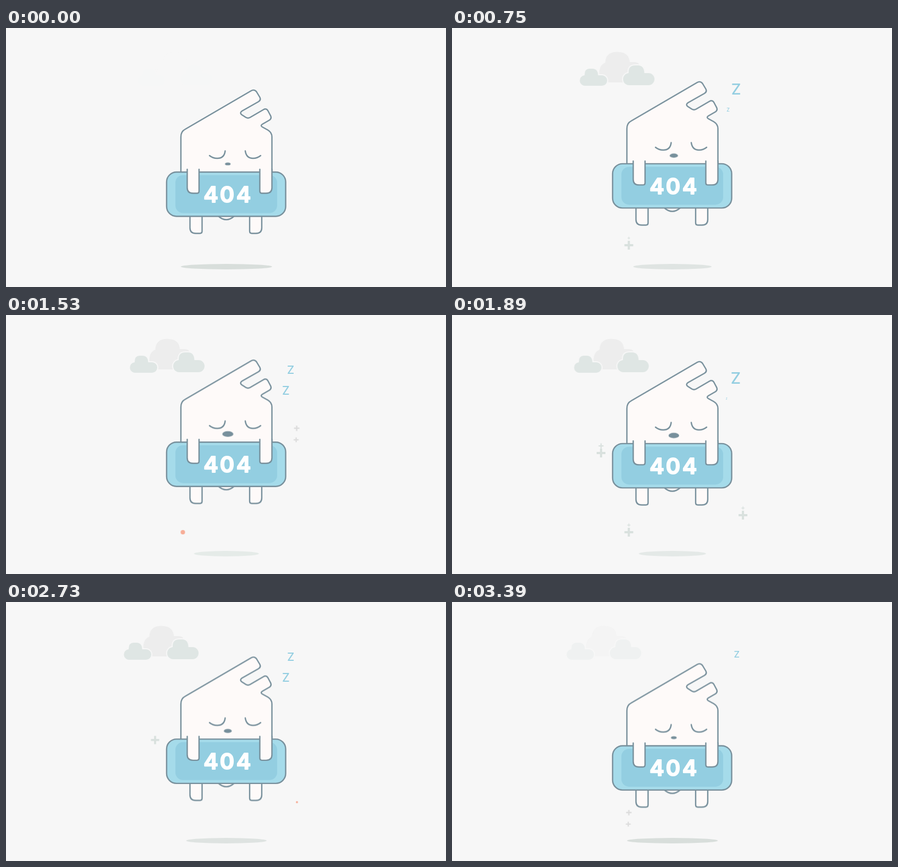
Recreate the animation shown at these times as an HTML page. Size 800 by 471 pixels, loop 3420 ms.

```html
<!DOCTYPE html>
<html lang="en">
<head>
<meta charset="utf-8">
<title>404</title>
<style>
  html, body { margin: 0; height: 100%; overflow: hidden; background: #f7f7f7; }
  svg { display: block; width: 800px; height: 471px; }
  svg * { animation: 3420ms linear infinite backwards; }

  .line { fill: none; stroke: #78909c; stroke-width: 2.4; stroke-linecap: round; stroke-linejoin: round; }
  .skin { fill: #fefaf9; }
  .sign { fill: #a5dbea; }
  .panel { fill: #93cee1; }
  .front { fill: #dfe6e4; stroke: #f7f7f7; stroke-width: 4; paint-order: stroke; }
  .code { font: 600 40px Inter, sans-serif; fill: #fff; stroke: #fff; stroke-width: 2; stroke-linejoin: round; text-anchor: middle; }

  .clouds { animation-name: drift, fade; }
  @keyframes drift { from { transform: translateX(13.9px); } to { transform: translateX(-17.2px); } }
  @keyframes fade { 0% { opacity: .03; } 14%, 89% { opacity: 1; } 100% { opacity: .3; } }

  .body { animation-name: float; }
  @keyframes float { 46.5%, 49.1% { transform: translateY(-32px); } }

  .mouth { fill: #78909c; animation-name: yawn; }
  @keyframes yawn { 0%, 100% { transform: scale(.5); } 46.5%, 49.1% { transform: scale(1); } }

  .shadow { fill: #d8dedb; animation-name: shrink; }
  @keyframes shrink { 46.5%, 49.1% { transform: scaleX(.7); fill: #e6ebe9; } }

  /* each snore lives 1200 ms of the loop */
  .zx { animation-name: zx; }
  .zy { animation-name: zy; }
  .z { font: 500 28.9px Inter, sans-serif; fill: #93cee1; text-anchor: middle; animation-name: zsize; }
  @keyframes zx {
    0% { transform: translateX(496px); animation-timing-function: cubic-bezier(.33, 1, .68, 1); }
    35.1%, 100% { transform: translateX(518px); }
  }
  @keyframes zy {
    0% { transform: translateY(156px); }
    35.1%, 100% { transform: translateY(80.5px); }
  }
  @keyframes zsize {
    0% { transform: scale(0); animation-timing-function: cubic-bezier(.39, .575, .565, 1); }
    17.55% { transform: scale(1); animation-timing-function: cubic-bezier(.47, 0, .745, .715); }
    35.1%, 100% { transform: scale(0); }
  }

  .low, .high { fill: none; stroke: #d9e1de; stroke-width: 4; }
  .low { animation-name: low; }
  .high { animation-name: high; }
  @keyframes low {
    0% { transform: scale(0); }
    4.4%, 8% { transform: scale(1); stroke: #d9e1de; }
    11.7% { transform: translate(-1px, 9px) scale(.56); stroke: #dcdcdc; }
    14.6%, 100% { transform: translate(-1px, 9px) scale(0); }
  }
  @keyframes high {
    0%, 4.4% { transform: translateY(-13px) scale(0); }
    7.3% { transform: translateY(-13px) scale(.7); stroke: #d9e1de; }
    11.7% { transform: translateY(-12px) scale(.62); stroke: #dcdcdc; }
    14.6%, 100% { transform: translateY(-12px) scale(0); }
  }

  .dot { fill: #f7ae98; animation-name: dot; }
  @keyframes dot {
    0% { transform: scale(0); }
    4.4% { transform: scale(1); }
    8.8%, 100% { transform: scale(0); }
  }

  /* hides what would run past the end of the loop */
  .cut { animation-name: cut; }
  @keyframes cut {
    0%, 14.9% { opacity: 0; }
    15%, 100% { opacity: 1; }
  }
</style>
</head>
<body>
<svg viewBox="0 0 800 471" xmlns="http://www.w3.org/2000/svg">
  <g class="clouds">
    <path fill="#ededed" d="M279 99Q261 97 260.500 82Q261 67 271.500 63Q272 43 294 43.500Q315 44 316 62H326Q333 63 334 68L330 90L308 99Z"/>
    <path class="front" d="M235.500 105A9.500 9.500 0 0 1 234 86V85Q234 74 243 74H248Q258 74 258.500 86H265.500A9.500 9.500 0 0 1 265.500 105Z"/>
    <path class="front" d="M316 104A11 11 0 0 1 314 82V80Q314 68 326 68H331Q342 68 342.500 82H350A11 11 0 0 1 350 104Z"/>
  </g>

  <g transform="translate(400.800 434)"><ellipse class="shadow" rx="83" ry="5"/></g>

  <g class="body">
    <path class="line skin" d="M318 264V198Q318 188 326 184L446 114Q452 111 455.500 116L461.500 126Q464 131 459 134L429 151Q424 154.500 429 158L436 162.500Q440 165 444 162.500L468 148.500Q473 145.500 476 150L480.500 158.500Q484 164 479 167.500L466 175Q462 177.500 466 180L476 185.500Q483.500 190 483.500 198V264"/>
    <path class="line skin" d="M386 342Q393 348.500 400.500 348.500T415 342"/>
    <path class="line skin" d="M334.500 340V363.500Q334.500 373.500 345 373.500H352.500Q356.500 373.500 356.500 369.500V340"/>
    <path class="line skin" d="M443 340V369.500Q443 373.500 447 373.500H454.500Q465 373.500 465 363.500V340"/>
    <path class="line" d="M370 232Q376 237 384 237Q397 237 398.500 223.500"/>
    <path class="line" d="M435 223.500Q437 237 449 237Q457 237 463 232"/>
    <g transform="translate(403.300 247.200)"><ellipse class="mouth" rx="10.200" ry="5.200"/></g>
    <rect class="line sign" x="292" y="262" width="216.500" height="80.500" rx="18"/>
    <rect class="panel" x="308" y="267.500" width="185" height="69" rx="14"/>
    <path class="line skin" d="M329.500 257V290.500Q329.500 300.500 340 300.500H347Q351 300.500 351 296.500V257"/>
    <path class="line skin" d="M461.500 257V296.500Q461.500 300.500 465.500 300.500H473Q483.500 300.500 483.500 290.500V257"/>
    <text class="code" x="372.500 402 432" y="317">404</text>
  </g>

  <g id="fx"></g>
</svg>
<script>
  const LOOP = 3420;
  const fx = document.getElementById('fx');
  const spots = { a: [529, 364], b: [271, 251], c: [528.5, 218], d: [321.5, 395] };
  const plus = 'M-8 0H8M0 -8V8';

  const add = (start, life, markup) => {
    const late = start + life > LOOP ? ' class="cut"' : '';
    const timed = markup.replaceAll('class=', `style="animation-delay:${start}ms" class=`);
    fx.insertAdjacentHTML('beforeend', `<g${late}>${timed}</g>`);
  };
  const at = (spot, inner) => `<g transform="translate(${spots[spot]})">${inner}</g>`;

  const snore = start => add(start, 1200,
    '<g class="zx"><g class="zy"><text class="z" y="10.5">Z</text></g></g>');
  const twinkle = (spot, start) => add(start, 500,
    at(spot, `<path class="low" d="${plus}"/><path class="high" d="${plus}"/>`));
  const pop = (spot, start) => add(start, 300, at(spot, '<circle class="dot" r="7"/>'));

  for (let i = 0; i < 5; i++) snore(34 + i * 598);

  Object.entries({
    a: [170, 1690, 2225],
    b: [830, 1660, 2590],
    c: [1130, 2770],
    d: [560, 1690, 2230, 2990]
  }).forEach(([spot, starts]) => starts.forEach(s => twinkle(spot, s)));

  Object.entries({ a: [1030, 2690], b: [60], c: [388, 2070], d: [1316] })
    .forEach(([spot, starts]) => starts.forEach(s => pop(spot, s)));
</script>
</body>
</html>
```
